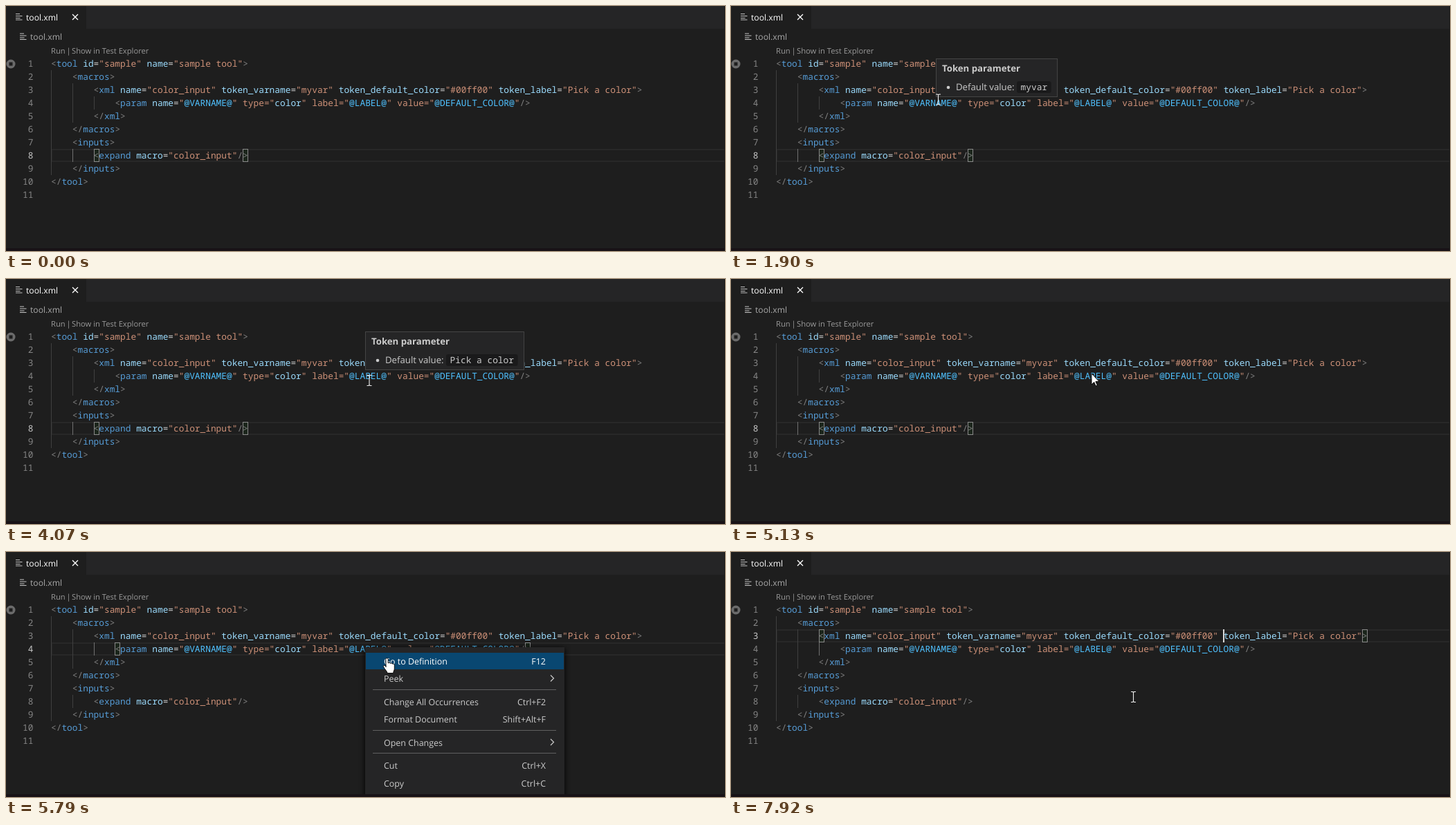
An HTML page that plays this animation: 1039 px wide and 355 px high, repeating every 8000 ms.

```html
<!DOCTYPE html>
<html lang="en">
<head>
<meta charset="utf-8">
<title>Go to definition of a token parameter</title>
<style>
  html, body { margin: 0; width: 100%; height: 100%; overflow: hidden; background: #1e1e1e; }
  svg { display: block; width: 1039px; height: 355px; }
  text { font: 12.45px "Open Sans", "Noto Sans", sans-serif; fill: #ccc; text-rendering: geometricPrecision; white-space: pre; }
  .code { font: 12.83px "Noto Sans Mono", "DejaVu Sans Mono", monospace; }
  .title { font-size: 12.2px; }
  .lens { font-size: 11.2px; fill: #999; }
  .tip { font-size: 13.2px; }
  .bold { font-weight: 700; }
  .end { text-anchor: end; }
</style>
</head>
<body>
<svg id="stage" viewBox="0 0 1039 355"></svg>
<script>
const LOOP = 8000, LEFT = 65, TOP = 74, CHAR = 7.698, ROW = 19;
const stage = document.getElementById('stage');

const source = `<tool id="sample" name="sample tool">
    <macros>
        <xml name="color_input" token_varname="myvar" token_default_color="#00ff00" token_label="Pick a color">
            <param name="@VARNAME@" type="color" label="@LABEL@" value="@DEFAULT_COLOR@"/>
        </xml>
    </macros>
    <inputs>
        <expand macro="color_input"/>
    </inputs>
</tool>
`.split('\n');

const color = { bracket: '#808080', tag: '#569cd6', attr: '#9cdcfe', equals: '#d4d4d4', string: '#ce9178', token: '#4fc1ff' };

const colX = col => LEFT + col * CHAR;
const rowY = line => TOP + (line - 1) * ROW;

function add(parent, name, attrs = {}, text) {
  const el = document.createElementNS('http://www.w3.org/2000/svg', name);
  for (const key in attrs) el.setAttribute(key, attrs[key]);
  if (text !== undefined) el.textContent = text;
  parent.append(el);
  return el;
}
const group = (parent = stage) => add(parent, 'g');
const rect = (parent, x, y, width, height, fill, more) => add(parent, 'rect', { x, y, width, height, fill, ...more });
const label = (parent, x, y, text, cls = '', more) => add(parent, 'text', { x, y, class: cls, ...more }, text);
const path = (parent, d, more) => add(parent, 'path', { d, fill: 'none', ...more });
const show = (el, on) => el.setAttribute('visibility', on ? 'visible' : 'hidden');
const move = (el, x, y) => el.setAttribute('transform', `translate(${x} ${y})`);

// Editor frame
rect(stage, 0, 0, 1039, 355, '#1e1e1e');
rect(stage, 116, 0, 923, 33, '#252526');

function fileIcon(x, y) {
  path(stage, `M${x} ${y + .5}h6M${x} ${y + 3.5}h9.5M${x} ${y + 6.5}h6.5M${x} ${y + 9}h9.5`, { stroke: '#c5c5c5', 'stroke-width': 1.2 });
}
fileIcon(14, 11);
label(stage, 29, 20.5, 'tool.xml', 'title', { style: 'fill:#fff' });
path(stage, 'M96 12l8 8m0-8l-8 8', { stroke: '#fff', 'stroke-width': 1.3 });
fileIcon(20, 39.5);
label(stage, 35, 48.7, 'tool.xml', 'title', { style: 'fill:#a9a9a9' });

[[65, 'Run'], [87.4, '|'], [95, 'Show in Test Explorer']].forEach(([x, text]) => label(stage, x, 69, text, 'lens'));
add(stage, 'circle', { cx: 7, cy: 84, r: 6.5, fill: '#6b6b6b' });
rect(stage, 4.5, 81.5, 5, 5, '#1e1e1e');

// Current line, indent guides and highlights
const lineBox = rect(stage, LEFT + 1, 0, 980, ROW - 2, 'none', { stroke: '#282828', 'stroke-width': 2 });
const guide = (col, from, to) => rect(stage, Math.round(colX(col)), rowY(from), 1, (to - from + 1) * ROW, '#404040');
guide(0, 2, 9);
guide(4, 3, 5);
const guideInputs = guide(4, 8, 8);
const guideXml = guide(8, 4, 4);
const found = rect(stage, 712, rowY(3), 200, ROW, '#613214');
const brackets = [0, 1].map(() => rect(stage, 0, 0, 7, ROW - 1, 'rgba(0,100,0,.1)', { stroke: '#888' }));

// Code text
function drawLine(text, y) {
  let afterOpen = false;
  for (const m of text.matchAll(/<\/?|\/?>|=|@\w+@|"(?=@)|"[^"@]*"|"|\w+/g)) {
    const part = m[0];
    let kind = 'attr';
    if (/^[<\/>]/.test(part)) kind = 'bracket';
    else if (part === '=') kind = 'equals';
    else if (part[0] === '@') kind = 'token';
    else if (part[0] === '"') kind = 'string';
    else if (afterOpen) kind = 'tag';
    afterOpen = part[0] === '<';
    label(stage, colX(m.index), y, part, 'code', { style: 'fill:' + color[kind] });
  }
}
const numbers = source.map((text, i) => {
  const y = rowY(i + 1) + 14;
  drawLine(text, y);
  return label(stage, 39.5, y, i + 1, 'code end');
});
const caret = rect(stage, 711, rowY(3), 2, ROW, '#d8d8d8');

// Hover card anchored above line 4
function hoverCard(x, value) {
  const g = group(), size = value.length * CHAR;
  rect(g, x + .5, 76.5, 126.6 + size + 10, 55, '#252526', { stroke: '#454545' });
  label(g, x + 9, 95, 'Token parameter', 'tip bold');
  add(g, 'circle', { cx: x + 18, cy: 118, r: 2.3, fill: '#ccc' });
  label(g, x + 29, 122, 'Default value:', 'tip');
  rect(g, x + 117, 109, size + 11.2, 17, 'rgba(10,10,10,.4)', { rx: 3 });
  label(g, x + 122.6, 122, value, 'code');
  return g;
}
const cardVar = hoverCard(296, 'myvar');
const cardLabel = hoverCard(519, 'Pick a color');

// Context menu
const menu = group();
menu.style.filter = 'drop-shadow(0 2px 4px #000)';
rect(menu, 519, 138, 288, 240, '#252526');
const picked = rect(menu, 520, 146, 286, 24, '#094771');
[
  [158, 'Go to Definition', 'F12'], [183.5, 'Peek'],
  [217, 'Change All Occurrences', 'Ctrl+F2'], [242.5, 'Format Document', 'Shift+Alt+F'],
  [276, 'Open Changes'], [309.5, 'Cut', 'Ctrl+X'], [335, 'Copy', 'Ctrl+C']
].forEach(([y, name, keys], i) => {
  const style = i ? '' : 'fill:#fff';
  label(menu, 546, y + 4.7, name, '', { style });
  if (keys) label(menu, 780, y + 4.7, keys, 'end', { style });
  else path(menu, `M787 ${y - 5}l4.5 4.5l-4.5 4.5`, { stroke: '#ccc', 'stroke-width': 1.2 });
});
[199, 258, 291].forEach(y => rect(menu, 530, y, 265, 1, '#606060'));

rect(stage, 0, 351, 1039, 4, '#181216');
rect(stage, 1038, 0, 1, 355, '#151515');

// Mouse pointers, each with its hot spot at 0,0
const outline = { fill: '#fff', stroke: '#000', 'stroke-width': .9, 'stroke-linejoin': 'round' };
const pointers = {
  beam: path(stage, 'M-3.5-7.5h2.5l1 1l1-1h2.5M0-6.5v13M-3.5 7.5h2.5l1-1l1 1h2.5', { stroke: '#f0f0f0', 'stroke-width': 1.1 }),
  arrow: path(stage, 'M0 0V16l3.7-3.6 2.4 5.6 2.2-1-2.4-5.4h5.1z', outline),
  hand: path(stage, 'M-1.7 1.5a1.7 1.7 0 0 1 3.4 0v5.5c1-.9 3-.7 3.3.5 1-.7 2.8-.4 3.1.8 1.1-.5 2.7 0 2.7 1.7v5c0 2.5-1.6 3.5-1.6 6.5h-8.6c0-2.5-3.2-4.5-5.6-9.2-.8-1.7 1.2-2.9 2.4-1.4l1.2 1.6z', outline)
};

// Step tables: [time, value...]
const mouse = [
  [0, 'none', 0, 0], [660, 'beam', 484.5, 243], [810, 'beam', 418, 189], [930, 'beam', 366.5, 148],
  [1080, 'beam', 323.5, 134], [1230, 'beam', 310, 133], [1350, 'beam', 303.5, 134.5], [1500, 'beam', 299.5, 135.5],
  [2740, 'beam', 308.5, 138], [2890, 'beam', 354, 141], [3040, 'beam', 419, 138], [3160, 'beam', 451.5, 136.5],
  [3310, 'beam', 473, 142], [3430, 'beam', 496, 147], [3550, 'beam', 514, 149], [3670, 'beam', 525, 147],
  [4590, 'beam', 524.5, 142], [4710, 'beam', 523.5, 138], [4980, 'beam', 522.5, 137.5],
  [5130, 'arrow', 521, 137], [5520, 'arrow', 531, 145], [5640, 'hand', 547, 153], [5790, 'hand', 550.5, 154],
  [6550, 'beam', 551.5, 154], [7070, 'beam', 553.5, 158], [7220, 'beam', 563.5, 172], [7370, 'beam', 571, 195],
  [7490, 'beam', 575, 209], [7640, 'beam', 575.5, 213], [7920, 'beam', 581.5, 210]
];
const currentLine = [[0, 8], [5250, 4], [6550, 3]];
const bracketPair = [[0, 8, 8, 36], [5250, 4, 12, 89], [6670, 3, 8, 110]];
const varFade = [[0, 0], [1780, .5], [1900, 1], [2890, 0]];
const labelFade = [[0, 0], [4070, 1], [4860, 0], [5370, 1], [5520, 0]];
const caretOn = [[0, 0], [6550, 1], [7070, 0], [7490, 1]];

const at = (steps, t) => steps.findLast(step => step[0] <= t).slice(1);
const within = (t, from, to) => t >= from && t < to;

function draw(t) {
  const [line] = at(currentLine, t);
  lineBox.setAttribute('y', rowY(line) + 1);
  numbers.forEach((n, i) => n.style.fill = i + 1 === line ? '#c6c6c6' : '#858585');
  guideInputs.setAttribute('fill', line === 8 ? '#707070' : '#404040');
  guideXml.setAttribute('fill', line === 8 ? '#404040' : '#707070');

  const [pairLine, ...cols] = at(bracketPair, t);
  brackets.forEach((box, i) => {
    box.setAttribute('x', Math.round(colX(cols[i])) + .5);
    box.setAttribute('y', rowY(pairLine) + .5);
  });

  cardVar.setAttribute('opacity', at(varFade, t)[0]);
  cardLabel.setAttribute('opacity', at(labelFade, t)[0]);
  show(menu, within(t, 5250, 6550));
  show(picked, within(t, 5640, 6550));
  show(found, within(t, 6550, 6920));
  show(caret, at(caretOn, t)[0]);

  const [shape, x, y] = at(mouse, t);
  for (const name in pointers) {
    show(pointers[name], name === shape);
    move(pointers[name], x, y);
  }
}

const start = performance.now();
function tick() {
  draw((performance.now() - start) % LOOP);
  requestAnimationFrame(tick);
}
tick();
</script>
</body>
</html>
```
